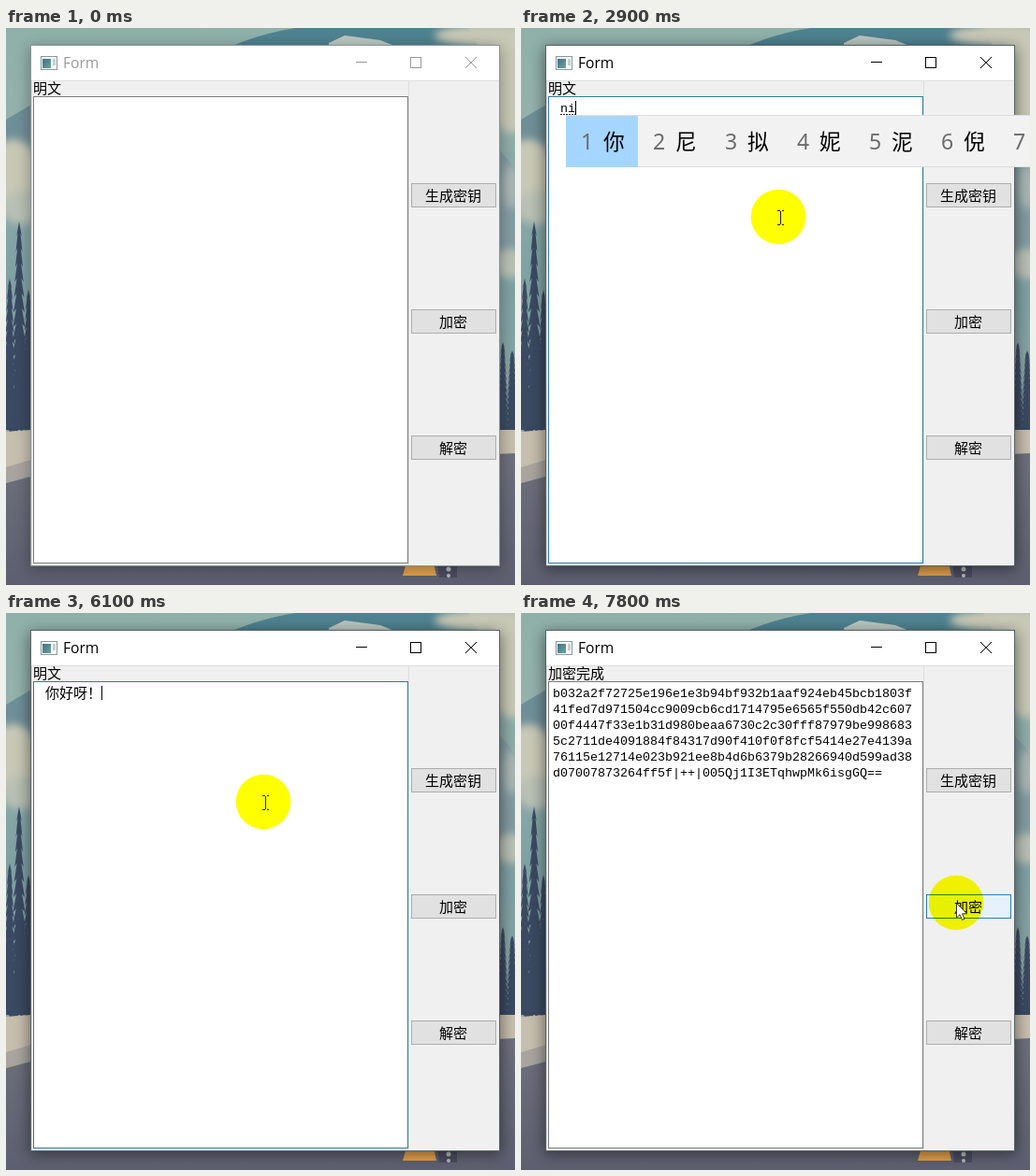
These frames come from a looping animation (544 by 596 pixels, 8 s). An HTML page:

```html
<!DOCTYPE html>
<html lang="zh-CN">
<head>
<meta charset="utf-8">
<title>Form</title>
<style>
html, body { margin: 0; width: 100%; height: 100%; overflow: hidden; background: #8fb0a9; }
svg { display: block; width: 544px; height: 596px; }
text { white-space: pre; }
.cjk { font: 15px "Noto Sans CJK SC", "Noto Sans CJK", sans-serif; }
.mono { font: 13.333px "Liberation Mono", monospace; }
.title { font: 15.6px "Open Sans", "Noto Sans", sans-serif; }
.num { font: 23px "Noto Sans", sans-serif; fill: #6b6b6b; }
.cand { font: 22.7px "Noto Sans CJK SC", "Noto Sans CJK", sans-serif; }
.mid { text-anchor: middle; }
.crisp { shape-rendering: crispEdges; }
#halo { mix-blend-mode: multiply; }
</style>
</head>
<body>
<svg id="stage" viewBox="0 0 544 596">
  <defs>
    <linearGradient id="sky" x2="0" y2="1">
      <stop offset="0" stop-color="#8fb0a9"/><stop offset=".15" stop-color="#94b1ab"/>
      <stop offset=".45" stop-color="#7fa1a4"/><stop offset=".7" stop-color="#8ca6a4"/>
    </linearGradient>
    <linearGradient id="road" x2="0" y2="1">
      <stop offset="0" stop-color="#6f707c"/><stop offset="1" stop-color="#5d5f70"/>
    </linearGradient>
    <linearGradient id="iconFill" x2="1" y2="1">
      <stop offset="0" stop-color="#3f6f93"/><stop offset="1" stop-color="#6fa58f"/>
    </linearGradient>
    <filter id="soft" x="-50%" y="-50%" width="200%" height="200%"><feGaussianBlur stdDeviation="4"/></filter>
    <filter id="shade" x="-10%" y="-10%" width="120%" height="120%"><feGaussianBlur stdDeviation="8"/></filter>
  </defs>

  <g id="scenery">
    <rect width="544" height="596" fill="url(#sky)"/>
    <path d="M240 20Q285 0 345 -4H492L505 20Z" fill="#4f8290"/>
    <path d="M345 16L362 8 400 13 415 19H345Z" fill="#b9c7c0"/>
    <path d="M0 98L27 82V160H0Z" fill="#6f8f98"/>
    <path d="M527 130L544 150V255H527Z" fill="#839ca2"/>
    <g filter="url(#soft)" fill="#c8c8b6">
      <ellipse cx="8" cy="155" rx="28" ry="36"/>
      <ellipse cx="18" cy="192" rx="24" ry="18" fill="#b8c0b4"/>
      <ellipse cx="520" cy="8" rx="62" ry="12"/>
      <ellipse cx="540" cy="58" rx="28" ry="54"/>
      <ellipse cx="540" cy="170" rx="9" ry="24" fill="#aab7b4"/>
      <ellipse cx="540" cy="252" rx="20" ry="16" fill="#b9bfb4"/>
    </g>
    <g id="trees" fill="#3b4a62"/>
    <path d="M0 432L27 430 544 430V460L27 475 0 486Z" fill="#c6beae"/>
    <path d="M0 470L27 462V478L0 488Z" fill="#a9a49e"/>
    <path d="M0 487L27 480 544 455V596H0Z" fill="url(#road)"/>
    <path d="M428 572H457L460 586H424Z" fill="#e3a04c"/>
    <path d="M461 572H482V588H463Z" fill="#4a4d60"/>
    <g fill="#b9bbbd"><circle cx="473" cy="579" r="2.5"/><circle cx="473" cy="586" r="2"/></g>
  </g>

  <rect id="shadow" x="25" y="21" width="504" height="558" filter="url(#shade)"/>
  <rect id="frame" x="26.5" y="18.5" width="501" height="557" fill="#f0f0f0"/>
  <g class="crisp">
    <rect x="27" y="19" width="500" height="37" fill="#fff"/>
    <path d="M27 56.5H527M27.5 57V575M430.5 57V575" stroke="#dedede" fill="none"/>
    <rect x="37.5" y="30.5" width="17" height="14" fill="#f7f9f9" stroke="#87989d"/>
    <rect x="39" y="33" width="9" height="10" fill="url(#iconFill)"/>
    <rect x="50" y="33" width="3" height="7" fill="#c5ced0"/>
  </g>
  <g id="caption">
    <text class="title" x="61" y="43" fill="currentColor">Form</text>
    <g stroke="currentColor" fill="none">
      <path class="crisp" d="M374 36.5H386M432.5 31.5H443.5V42.5H432.5Z"/>
      <path d="M491 31L503 43M503 31L491 43"/>
    </g>
  </g>
  <text id="label" class="cjk" x="29" y="70"></text>
  <g class="crisp">
    <rect x="29" y="73" width="401" height="500" fill="#fff"/>
    <path id="edgeA" d="M29 73.5H429.5V573" fill="none"/>
    <path id="edgeB" d="M29.5 73V572.5H430" fill="none"/>
  </g>
  <g id="buttons"></g>
  <g id="cipher" class="mono"></g>
  <text id="done" class="cjk" x="42" y="91"></text>
  <text id="comp" class="mono" x="42" y="90"></text>
  <path id="underline" class="crisp" stroke="#222" stroke-dasharray="2 1"/>
  <rect id="caret" class="crisp" y="78" width="1" height="15"/>
  <g id="popup"></g>
  <g id="pointer">
    <circle id="halo" r="29.3" fill="#ff0"/>
    <path id="beam" class="crisp" d="M-1 -6.5H1.5M3.5 -6.5H6M2.5 -6V8M-1 8.5H1.5M3.5 8.5H6" stroke="#1c1c50" fill="none"/>
    <path id="arrow" d="M.5 .5V16L4 12.7 6.6 18.4 9 17.3 6.5 11.8H11.5Z" fill="#fff" stroke="#222" stroke-width=".9"/>
  </g>
</svg>
<script>
const $ = id => document.getElementById(id);
const attrs = (el, values) => { for (const k in values) el.setAttribute(k, values[k]); return el; };
function add(parent, tag, values, text = '') {
  const el = attrs(document.createElementNS(parent.namespaceURI, tag), values);
  el.textContent = text;
  return parent.appendChild(el);
}
const show = (el, on) => el.style.display = on ? '' : 'none';

function tree(x, top, base, half) {
  let left = '', right = '';
  const tiers = 14;
  for (let i = 1; i <= tiers; i++) {
    const y = top + (base - top) * i / tiers, w = half * (0.2 + 0.8 * i / tiers);
    left += `L${x - w} ${y}L${x - w * 0.5} ${y - 4}`;
    right = `L${x + w * 0.5} ${y - 4}L${x + w} ${y}` + right;
  }
  add($('trees'), 'path', { d: `M${x} ${top}${left}${right}Z` });
}
[[14, 207, 11], [4, 268, 10], [24, 280, 10], [-2, 320, 9], [18, 330, 13],
 [531, 336, 8], [541, 345, 9]].forEach(([x, top, half]) => tree(x, top, 434, half));

const buttons = ['生成密钥', '加密', '解密'].map((name, i) => {
  const y = 166 + 135 * i;
  const box = add($('buttons'), 'rect', { class: 'crisp', x: 433.5, y: y + .5, width: 90, height: 25, fill: '#e1e1e1', stroke: '#adadad' });
  add($('buttons'), 'text', { class: 'cjk mid', x: 478, y: y + 19 }, name);
  return box;
});

['b032a2f72725e196e1e3b94bf932b1aaf924eb45bcb1803f',
 '41fed7d971504cc9009cb6cd1714795e6565f550db42c607',
 '00f4447f33e1b31d980beaa6730c2c30fff87979be998683',
 '5c2711de4091884f84317d90f410f0f8fcf5414e27e4139a',
 '76115e12714e023b921ee8b4d6b6379b28266940d599ad38',
 'd07007873264ff5f|++|005Qj1I3ETqhwpMk6isgGQ==',
].forEach((line, i) => add($('cipher'), 'text', { x: 34, y: 90 + 17 * i }, line));

const lists = {
  i: 'i I 爱',
  n: '你 能 年 那 女 呢 哪',
  ni: '你 尼 拟 妮 泥 倪 逆',
  nih: '你好 你会 你还 你和 你后',
  nihao: '你好 你号 拟好 你 尼',
  nihaoy: '你好呀 你好 你号 拟好 你',
};
function drawPopup(left, key) {
  const g = $('popup');
  g.replaceChildren();
  const items = lists[key].split(' ');
  const widths = items.map(s => key === 'i' ? 68 : 54.3 + 22.7 * s.length);
  const total = widths.reduce((a, b) => a + b);
  add(g, 'rect', { class: 'crisp', x: left + .5, y: 93.5, width: total - 1, height: 55, fill: '#f2f2f2', stroke: '#dcdcdc' });
  let x = left;
  items.forEach((item, i) => {
    if (!i) add(g, 'rect', { class: 'crisp', x, y: 94, width: widths[0], height: 55, fill: '#a5d6ff' });
    add(g, 'text', { class: 'num', x: x + 16, y: 130 }, i + 1);
    add(g, 'text', { class: 'cand', x: x + 40, y: 130 }, item);
    x += widths[i];
  });
}

// Ticks are tenths of a second: [tick, composing, committed, popup x, popup list, popup opacity]
const typing = [
  [0, '', ''],
  [14, 'i', '', 48, 'i', .6], [15, 'i', '', 48, 'i', 1],
  [18, '', '', 48, 'i', .6], [19, '', '', 48, 'i', .2], [20, '', ''],
  [23, 'n', '', 48, 'n', .4], [24, 'n', '', 48, 'n', .8], [25, 'n', '', 48, 'n', 1],
  [29, 'ni', '', 48, 'ni', 1], [30, 'ni', '', 56, 'ni', 1],
  [31, "ni'h", '', 56, 'nih', 1], [32, "ni'ha", '', 72, 'nihao', 1],
  [33, "ni'hao", '', 80, 'nihao', 1], [34, "ni'hao", '', 88, 'nihao', 1],
  [36, "ni'hao'y", '', 88, 'nihaoy', 1], [37, "ni'hao'ya", '', 104, 'nihaoy', 1],
  [38, "ni'hao'ya", '', 112, 'nihaoy', 1],
  [42, '', '你好呀', 112, 'nihaoy', .8], [43, '', '你好呀', 112, 'nihaoy', .45],
  [44, '', '你好呀', 112, 'nihaoy', .15], [45, '', '你好呀'],
  [51, '', '你好呀！'], [74, '', ''],
];
const caretOn = [[4, 8], [18, 34], [40, 50], [51, 56], [61, 66], [71, 72]];
const path = [
  [1, 470, 470], [2, 380, 330], [3, 275, 202], [63, 279, 204], [64, 304, 213], [65, 345, 237],
  [66, 400, 262], [67, 455, 300], [68, 512, 370], [69, 514, 382], [70, 490, 336],
  [71, 478, 314], [73, 478, 314], [78, 465, 310],
];
function pointerAt(tick) {
  const i = path.findLastIndex(p => p[0] <= tick);
  const a = path[i], b = path[i + 1];
  // Rest until the move begins, glide only during the final drift.
  if (!b || a[0] !== 73) return a.slice(1);
  const u = (tick - a[0]) / (b[0] - a[0]);
  return [a[1] + (b[1] - a[1]) * u, a[2] + (b[2] - a[2]) * u];
}

function render(tick) {
  const active = tick >= 3, focused = active && tick < 72, finished = tick >= 74;
  $('caption').style.color = active ? '#000' : '#999';
  attrs($('shadow'), { opacity: active ? Math.min(.48, .38 + (tick - 3) * .1) : .3 });
  attrs($('frame'), { stroke: active ? '#596266' : '#8a9293' });
  attrs($('edgeA'), { stroke: focused ? '#2c7d93' : '#7a7a7a' });
  attrs($('edgeB'), { stroke: focused ? '#2f78ae' : '#7a7a7a' });
  $('label').textContent = finished ? '加密完成' : '明文';
  show($('cipher'), finished);

  const [, comp, done, left, key, alpha] = typing.findLast(s => s[0] <= tick);
  $('comp').textContent = comp;
  $('done').textContent = done;
  attrs($('underline'), { d: `M42 92.5h${8 * comp.length}` });
  show($('underline'), comp);
  const start = tick < 14 ? 34 : 42;
  attrs($('caret'), { x: start + 8 * comp.length + 15 * done.length });
  show($('caret'), caretOn.some(([a, b]) => tick >= a && tick < b));
  show($('popup'), key);
  if (key) {
    drawPopup(left, key);
    attrs($('popup'), { opacity: alpha });
  }

  show($('pointer'), tick >= 1);
  if (tick < 1) return;
  const [x, y] = pointerAt(tick);
  attrs($('halo'), { cx: x, cy: y });
  const inEdit = x > 29 && x < 430 && y > 73 && y < 573;
  for (const id of ['beam', 'arrow']) {
    attrs($(id), { transform: `translate(${x} ${y})` });
    show($(id), inEdit === (id === 'beam'));
  }
  const over = x > 433 && x < 524 && y > 301 && y < 327;
  const pressed = tick === 72 || tick === 73;
  attrs(buttons[1], {
    fill: pressed ? '#cce4f7' : over ? '#e5f1fb' : '#e1e1e1',
    stroke: pressed ? '#005499' : over ? '#2580b8' : '#adadad',
  });
}

let last = -1;
const origin = performance.now();
function frame() {
  const tick = Math.floor(((performance.now() - origin) % 8000) / 100);
  if (tick !== last) render(last = tick);
  requestAnimationFrame(frame);
}
frame();
</script>
</body>
</html>
```
